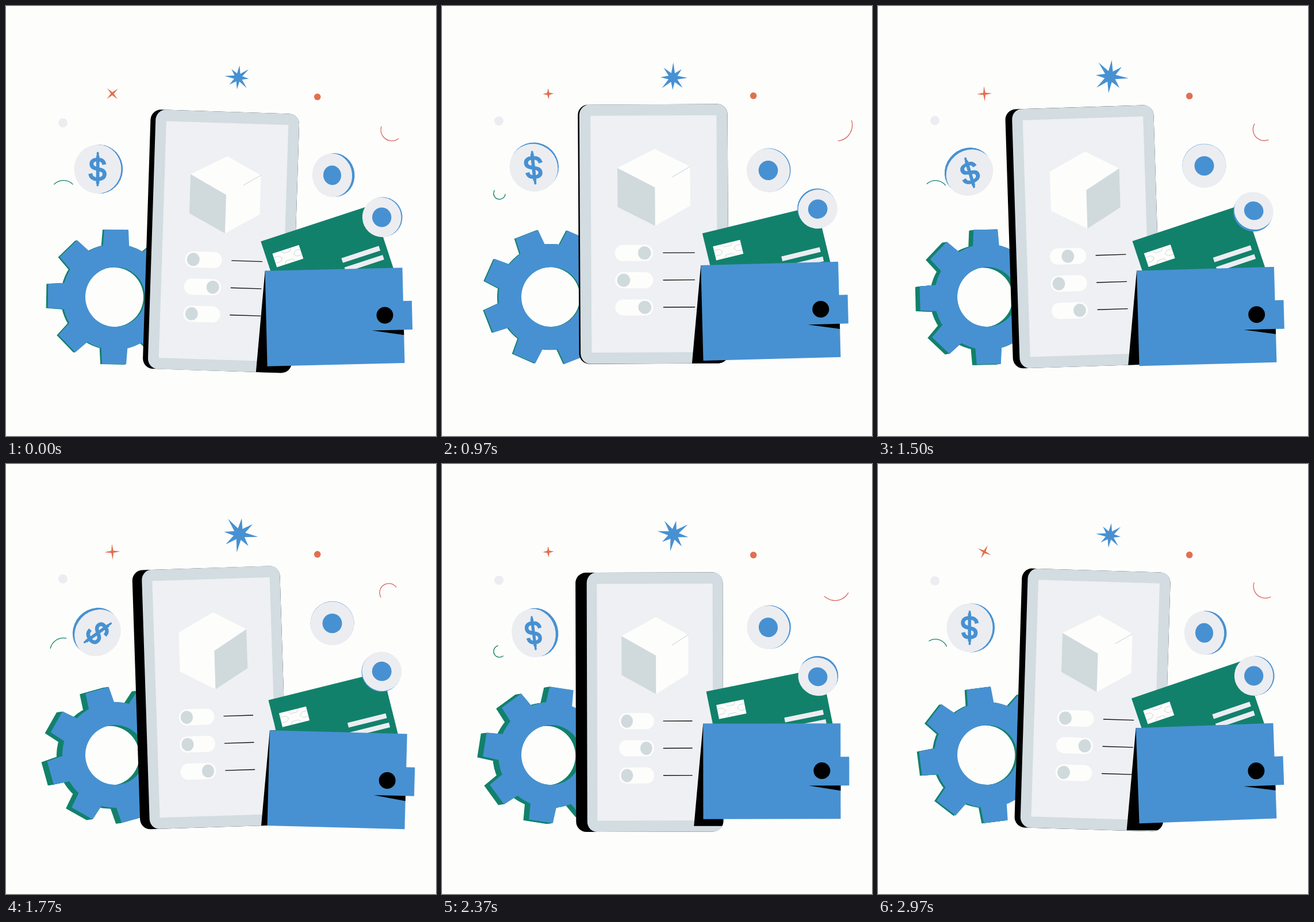
Write an HTML page with a canvas that moves like this. It is 748x748 px and loops after 3000 ms.

```html
<!DOCTYPE html>
<html lang="en">
<head>
<meta charset="utf-8">
<title>Digital wallet</title>
<style>
html, body { margin: 0; width: 100%; height: 100%; overflow: hidden; background: #fdfdfc; }
canvas { display: block; width: 748px; height: 748px; }
</style>
</head>
<body>
<canvas id="stage"></canvas>
<script>
const canvas = document.getElementById('stage');
const ratio = window.devicePixelRatio || 1;
canvas.width = canvas.height = 748 * ratio;
const c = canvas.getContext('2d');

const LOOP = 3000, CYCLE = 3040, HALF = CYCLE / 2, RAD = Math.PI / 180;
const WHITE = '#fdfdfc', BLUE = '#4791d2', GREEN = '#12816b', PALE = '#ecedf1',
  FRAME = '#d2dce1', SCREEN = '#eff0f3', GREY = '#d0dadd', ORANGE = '#e0704f', RED = '#d9655c';

let t = 0;

// Swing around mid that is highest at time peak
const wave = (mid, amp, peak, period = CYCLE) =>
  mid + amp * Math.cos((t - peak) / period * 2 * Math.PI);

const clamp = u => Math.max(0, Math.min(1, u));

// Eases from 0 to 1 around a moment
function ramp(at, width = 240) {
  const u = clamp((t - at) / width + .5);
  return u * u * (3 - 2 * u);
}

// Goes from 0 to 1 quickly first, then slowing
const easeOut = (start, time) => 1 - (1 - clamp((t - start) / time)) ** 1.4;

function at(x, y, angle, draw) {
  c.save();
  c.translate(x, y);
  c.rotate(angle * RAD);
  draw();
  c.restore();
}

function box(color, x, y, w, h, r = 0) {
  c.fillStyle = color;
  c.beginPath();
  c.roundRect(x, y, w, h, r);
  c.fill();
}

function oval(color, x, y, rx, ry = rx) {
  c.fillStyle = color;
  c.beginPath();
  c.ellipse(x, y, rx, ry, 0, 0, 2 * Math.PI);
  c.fill();
}

function poly(color, ...pts) {
  c.fillStyle = color;
  c.beginPath();
  pts.forEach(p => c.lineTo(...p));
  c.closePath();
  c.fill();
}

function line(color, width, path) {
  c.strokeStyle = color;
  c.lineWidth = width;
  c.stroke(new Path2D(path));
}

const gearShape = new Path2D();
gearShape.arc(0, 0, 92, 0, 2 * Math.PI);
gearShape.closePath();
const tooth = new Path2D('M-23 -86L-21 -117H21L23 -86Z');
for (let i = 0; i < 8; i++) gearShape.addPath(tooth, new DOMMatrix().rotate(45 * i));
gearShape.moveTo(52, 0);
gearShape.arc(0, 0, 52, 0, 2 * Math.PI, true);

function gear() {
  const spin = 360 * t / CYCLE + wave(-.7, 1.6, 1450, HALF);
  const depth = wave(5.5, 5.5, 2050);
  const layer = (color, d) => at(190 - d, 506 + d * .15, spin, () => {
    c.fillStyle = color;
    c.fill(gearShape);
  });
  for (let d = depth; d > 0; d -= 1.5) layer(GREEN, d);
  layer(BLUE, 0);
}

function cube() {
  const T = [2, -148], L = [-64, -115], R = [64, -117], M = [2, -81],
    BL = [-64, -47], B = [2, -14], BR = [64, -49];
  const faces = { left: [L, M, B, BL], top: [T, R, M, L], right: [M, R, BR, B] };
  const dark = t >= 265 && t < 750 ? 'top' : t >= 1500 && t < 2070 ? 'right' : 'left';
  poly(WHITE, T, R, BR, B, BL, L);
  poly(GREY, ...faces[dark]);
  if (dark == 'left') line(GREY, 1.2, 'M33 -99L64 -117');
}

function toggles() {
  const on = [ramp(265) - ramp(1500), 1 - ramp(265) + ramp(2070), ramp(750) - ramp(2070)];
  on.forEach((v, i) => {
    const y = 33 + 47.3 * i;
    box(WHITE, -69, y - 14, 67, 28, 14);
    oval(GREY, -54 + 37 * v, y, 11.5);
    line('#111', 1.4, `M16 ${y}H71`);
  });
}

function phone(pocket) {
  const depth = wave(10.5, 9.6, 2200), w = 261 - 1.25 * depth;
  const place = draw => at(wave(370.7, 8, 100), wave(405.5, 9, 2500), wave(0, 1.9, 130), draw);
  place(() => {
    box('#000', -w / 2 - depth, -225.5, w + depth, 451, 18);
    c.scale(w / 261, 1);
    box(FRAME, -130.5, -225.5, 261, 451, 18);
    box(SCREEN, -111, -206, 222, 412);
    cube();
    toggles();
  });

  // Dark side of the wallet, seen only against the phone
  c.save();
  place(() => {
    c.beginPath();
    c.roundRect(-w / 2, -225.5, w, 451, 18);
  });
  c.clip();
  const sin = Math.sin(pocket.angle * RAD), cos = Math.cos(pocket.angle * RAD);
  const x = 574 - 119.5 * cos + 166 * sin, bottom = pocket.y - 119.5 * sin;
  const top = bottom - 166 * cos;
  poly('#000', [x, top], [x - 16, bottom + 12], [600, bottom + 12], [600, top]);
  c.restore();
}

function card() {
  at(wave(453.5, 14, 580, HALF), wave(403.3, 8, 165, HALF), wave(-14.2, 4.8, 620, HALF), () => {
    box(GREEN, 0, 0, 204.5, 125);
    box(WHITE, 12.5, 26.5, 48.5, 25);
    line('#c9cfd3', .8, 'M13 34H22L27 39L22 44H13M61 34H52L47 39L52 44H61M28 27L31 32H43L46 27M28 51L31 46H43L46 51');
    box(PALE, 124, 71.5, 68.5, 8.5);
    box(PALE, 124, 88.5, 70, 8.5);
  });
}

function wallet(pocket) {
  at(574, pocket.y, pocket.angle, () => {
    box(BLUE, -119.5, -166, 239, 166);
    box(BLUE, 100, -108, 34.5, 50);
    poly('#000', [64, -58], [119.5, -58], [119.5, -49]);
    oval('#000', 87, -84, 14.5);
  });
}

// A disc tilted so that its rim shows towards (dx, dy)
function coin(x, y, r, dx, dy, mark) {
  const d = Math.hypot(dx, dy), dir = Math.atan2(dy, dx) / RAD;
  const squash = Math.sqrt(1 - Math.min(.6, (d / 10.5) ** 2));
  at(x, y, dir, () => {
    c.scale(squash, 1);
    oval(BLUE, d / squash, 0, r);
    oval(PALE, 0, 0, r);
    c.rotate(-dir * RAD);
    mark();
  });
}

function dollar() {
  c.rotate((180 * easeOut(0, 1050) + 360 * easeOut(1000, 1450)) * RAD);
  c.fillStyle = c.strokeStyle = BLUE;
  c.font = '57px "Liberation Sans", Arial, sans-serif';
  c.textAlign = 'center';
  c.lineWidth = 2.4;
  c.fillText('$', 0, 20);
  c.strokeText('$', 0, 20);
  line(BLUE, 4, 'M0 -28V28');
}

function coins() {
  const dot = () => oval(BLUE, 0, 0, 17);
  coin(159.5, wave(287, 8.5, 2090), 42.5,
    wave(1.2, 3, 2900) + wave(0, 2.4, 1000, HALF), wave(-1.6, 1.7, 0), dollar);
  coin(567.5, wave(286.2, 9, 200), 38, wave(2.1, 2.2, 50), -.5, dot);
  coin(653.7, wave(362, 9, 2600), 34.5,
    wave(.2, 2, 2800), wave(-1.2, 2, 1700) + wave(0, 2.8, 1420, HALF), dot);
}

// Pointed star with a length for every ray
function star(color, rays, core, length) {
  const pts = [];
  for (let i = 0; i < 2 * rays; i++) {
    const r = i % 2 ? core : length(i / 2), a = i * Math.PI / rays;
    pts.push([r * Math.sin(a), -r * Math.cos(a)]);
  }
  poly(color, ...pts);
}

// Piece of a circle, with its middle towards angle
function curl(color, x, y, r, angle, length) {
  const half = length / r / 2;
  c.strokeStyle = color;
  c.lineWidth = 1.3;
  c.beginPath();
  c.arc(x, y, r, angle * RAD - half, angle * RAD + half);
  c.stroke();
}

function confetti() {
  oval(PALE, 99, wave(201.3, 2, 2900), 8);
  oval(ORANGE, 541.7, wave(157.3, 1.2, 2600), 5.8);

  const size = wave(26.3, 5, 1850);
  at(wave(403.8, 2.5, 360, HALF), wave(123.5, 1.8, 500), wave(6, 5, 2300), () =>
    star(BLUE, 8, size * .33, i => size * (.95 + .12 * Math.sin(2.4 * i + t / CYCLE * 2 * Math.PI))));

  const glint = wave(11.7, 2.1, 180, HALF);
  at(185, 152.7, 45 + 42 * ramp(300, 800) + 48 * ramp(2900, 800), () =>
    star(ORANGE, 4, 2.6, () => glint));

  curl(GREEN, 100, 326, wave(17, 7, 150, HALF),
    270 - 720 * t / CYCLE + wave(45, 45, 730, HALF), 36);
  curl(RED, wave(676, 10, 1020, HALF), wave(215, 10, 370, HALF), wave(22, 6, 1020, HALF),
    160 + 360 * t / CYCLE + wave(-115, 130, 2600), 48);
}

function frame(now) {
  t = now % LOOP;
  c.setTransform(ratio, 0, 0, ratio, 0, 0);
  box(WHITE, 0, 0, 748, 748);
  c.lineCap = 'round';
  const pocket = { y: wave(622.6, 10.5, 350, HALF), angle: wave(-.2, 2.9, 480, HALF) };
  confetti();
  gear();
  phone(pocket);
  card();
  wallet(pocket);
  coins();
}

const start = performance.now();
(function loop() {
  frame(performance.now() - start);
  requestAnimationFrame(loop);
})();
</script>
</body>
</html>
```
